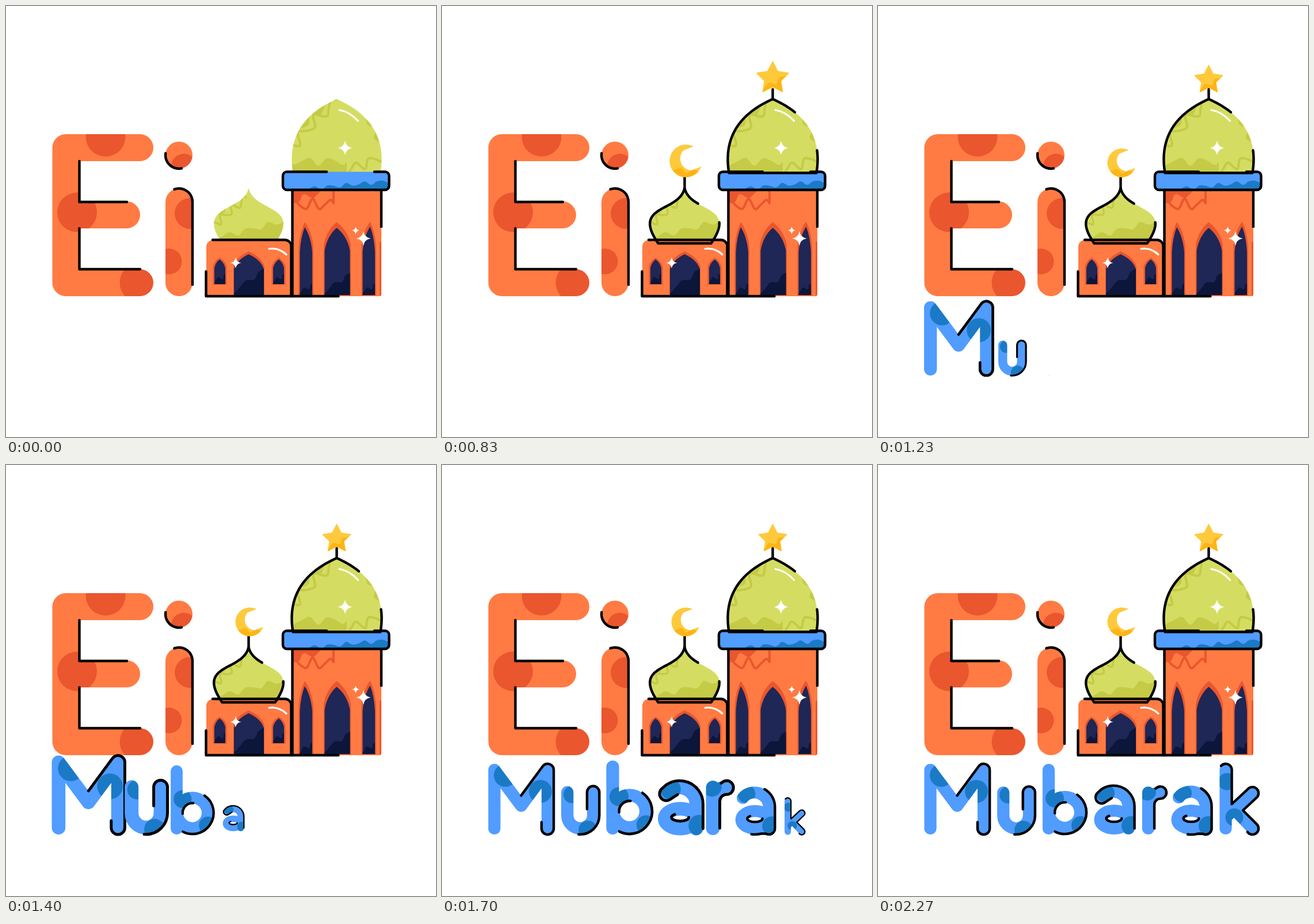
Animation of 747 by 750 pixels, one loop 4.01 s. Source, as an HTML page with a canvas:

```html
<!DOCTYPE html>
<html lang="en">
<head>
<meta charset="utf-8">
<title>Eid Mubarak</title>
<style>
html, body { margin: 0; width: 100%; height: 100%; overflow: hidden; background: #fff; }
canvas { display: block; }
</style>
</head>
<body>
<canvas id="stage" width="747" height="750"></canvas>
<script>
const W = 747, H = 750, LOOP = 4010, { PI } = Math, DEG = PI / 180;
const ORANGE = '#ff7b43', RUST = '#ea562e', BLUE = '#519cff', DEEP = '#1b7ac6';
const LIME = '#d4dd62', OLIVE = '#c5cb46', NAVY = '#1e2756', NIGHT = '#0b163a';
const GOLD = '#ffc93c', AMBER = '#fdb515', INK = '#000', WHITE = '#fff';

const ctx = document.getElementById('stage').getContext('2d');
const layer = document.createElement('canvas');
layer.width = W;
layer.height = H;
const lay = layer.getContext('2d');

// ---- paths ----
const clamp = v => Math.min(1, Math.max(0, v));

function pen(draw) {
  const p = new Path2D();
  draw(p);
  return p;
}

const poly = pts => pen(p => pts.forEach(q => p.lineTo(...q)));
const seg = (x0, y0, x1, y1) => poly([[x0, y0], [x1, y1]]);

function cubic(t, a, b, c, d) {
  const s = 1 - t;
  return s * s * s * a + 3 * s * s * t * b + 3 * s * t * t * c + t * t * t * d;
}

// wavy line between two points
function ripple(x0, y0, x1, y1, n, amp) {
  const dx = x1 - x0, dy = y1 - y0, len = Math.hypot(dx, dy);
  return Array.from({ length: 61 }, (_, i) => {
    const k = i / 60, a = k * n * 2 * PI;
    const off = amp * (Math.sin(a) + 0.3 * Math.sin(1.7 * a + 1)) / len;
    return [x0 + dx * k - dy * off, y0 + dy * k + dx * off];
  });
}

// ---- painting ----
function fill(p, color, c = ctx) {
  c.fillStyle = color;
  c.fill(p);
}

function line(p, color = INK, width = 4.4, c = ctx) {
  c.strokeStyle = color;
  c.lineWidth = width;
  c.lineCap = c.lineJoin = 'round';
  c.stroke(p);
}

function inside(p, draw) {
  ctx.save();
  ctx.clip(p);
  draw();
  ctx.restore();
}

// fills everything to the right of a wavy line, seen along its direction
function shade(color, x0, y0, x1, y1, n, amp) {
  const k = 50 / Math.hypot(x1 - x0, y1 - y0), nx = (y0 - y1) * k, ny = (x1 - x0) * k;
  fill(poly([...ripple(x0, y0, x1, y1, n, amp), [x1 + nx, y1 + ny], [x0 + nx, y0 + ny]]), color);
}

// thick round stroke carrying darker spots
function stroked(body, width, color, spotColor, spots) {
  lay.setTransform(1, 0, 0, 1, 0, 0);
  lay.clearRect(0, 0, W, H);
  lay.setTransform(ctx.getTransform());
  line(body, color, width, lay);
  lay.globalCompositeOperation = 'source-atop';
  for (const [x, y, r] of spots) fill(pen(p => p.arc(x, y, r, 0, 2 * PI)), spotColor, lay);
  lay.globalCompositeOperation = 'source-over';
  ctx.save();
  ctx.resetTransform();
  ctx.drawImage(layer, 0, 0);
  ctx.restore();
}

function trim(pts, part) {
  if (part <= 0) return;
  const steps = pts.slice(1).map((q, i) => Math.hypot(q[0] - pts[i][0], q[1] - pts[i][1]));
  let left = part * steps.reduce((a, b) => a + b);
  const shown = [pts[0]];
  for (let i = 0; i < steps.length && left > 0; i++) {
    const k = steps[i] ? Math.min(1, left / steps[i]) : 1;
    shown.push(pts[i].map((v, j) => v + (pts[i + 1][j] - v) * k));
    left -= steps[i];
  }
  line(poly(shown));
}

function scaled(x, y, s, draw) {
  if (s <= 0) return;
  ctx.save();
  ctx.translate(x, y);
  ctx.scale(s, s);
  ctx.translate(-x, -y);
  draw();
  ctx.restore();
}

function sparkle(x, y, r) {
  fill(pen(p => {
    p.moveTo(x + r, y);
    for (let i = 1; i <= 4; i++) {
      const a = i * PI / 2, m = a - PI / 4;
      p.quadraticCurveTo(x + r * 0.2 * Math.cos(m), y + r * 0.2 * Math.sin(m), x + r * Math.cos(a), y + r * Math.sin(a));
    }
  }), WHITE);
}

const gleam = (x0, y0, cx, cy, x1, y1) =>
  line(pen(p => { p.moveTo(x0, y0); p.quadraticCurveTo(cx, cy, x1, y1); }), WHITE, 3.2);

// ---- big letters ----
function drawEi() {
  const thick = 47, r = thick / 2, [top, mid, low] = [246.5, 363.5, 481.5];
  const E = poly([[232.5, top], [104, top], [104, low], [232.5, low]]);
  E.addPath(seg(104, mid, 209.5, mid));
  stroked(E, thick, ORANGE, RUST, [[173, 227.5, 34.5], [123.5, 359, 34.5], [232, low, 34.5]]);
  line(poly([[127.5, top + r], [127.5, mid - r + 1], [210, mid - r + 1]]));
  line(poly([[127.5, mid + r], [127.5, low - r], [233, low - r]]));

  const x = 300.5;
  stroked(seg(x, 259.5, x, 259.5), thick, ORANGE, RUST, [[309, 279, 22]]);
  line(pen(p => p.arc(x, 259.5, r, 188 * DEG, 79 * DEG, true)));
  stroked(seg(x, 341, x, low), thick, ORANGE, RUST, [[320, 361, 27], [283, 444.5, 22.5]]);
  line(pen(p => { p.arc(x, 341, r, -110 * DEG, 0); p.lineTo(x + r, 485); }));
}

// ---- domes: one half as a cubic, mirrored ----
const bigDome = makeDome(574.5, [0, 45, 88, 76], [162, 182, 218, 290.5], 0.8, 0.3);
const smallDome = makeDome(421.5, [0, 10, 93, 46], [317, 360, 345, 413], 0.76, 0.3);

function makeDome(x, xs, ys, from, to) {
  const side = (sign, a, b) => Array.from({ length: 31 }, (_, i) => {
    const t = a + (b - a) * i / 30;
    return [x + sign * cubic(t, ...xs), cubic(t, ...ys)];
  });
  return {
    shape: poly([...side(-1, 0, 1), ...side(1, 1, 0)]),
    outline: [...side(1, from, 1), ...side(-1, 1, 0), ...side(1, 0, to)]
  };
}

function drawDomes() {
  fill(bigDome.shape, LIME);
  inside(bigDome.shape, () => {
    shade(OLIVE, 494, 270, 592, 270, 2.5, 6);
    shade(OLIVE, 656, 252, 626, 194, 2, 5);
    shade(OLIVE, 566, 166, 500, 224, 2.5, 5);
    line(poly(ripple(574, 164, 496, 243, 3, 8)), OLIVE, 4.2);
    line(poly(ripple(586, 288, 656, 262, 2.5, 7)), OLIVE, 4.2);
  });
  gleam(579, 181, 597, 184, 611.5, 200);
  sparkle(589, 247, 12.5);

  fill(smallDome.shape, LIME);
  inside(smallDome.shape, () => {
    shade(OLIVE, 358, 405, 484, 374, 3.5, 4);
    shade(OLIVE, 412, 330, 360, 370, 2.5, 4);
    line(poly(ripple(418, 334, 364, 378, 3, 6)), OLIVE, 3.6);
  });
}

// ---- buildings ----
function arch(l, r, tip, top, side, base) {
  const y = top + (side - top) * 0.36;
  return pen(p => {
    p.moveTo(l, base);
    p.lineTo(l, side);
    p.quadraticCurveTo(l + (tip - l) * 0.2, y, tip, top);
    p.quadraticCurveTo(r + (tip - r) * 0.2, y, r, side);
    p.lineTo(r, base);
  });
}

function glaze(l, r, tip, top, side, base, frame, rise) {
  fill(arch(l - frame, r + frame, tip, top - rise, side - rise, base + 1), RUST);
  const pane = arch(l, r, tip, top, side, base);
  fill(pane, NAVY);
  inside(pane, () => shade(NIGHT, l - 4, base - 4, r + 4, base - (r - l) * 0.9, 2, 3));
}

function drawHall() {
  fill(pen(p => p.roundRect(348, 407, 148.5, 98, [12, 12, 0, 0])), ORANGE);
  glaze(362, 381, 371, 441, 456, 484, 2.5, 3);
  glaze(396, 448, 421.5, 432, 458, 503, 1, 5);
  glaze(464, 483, 474, 441, 456, 484, 2.5, 3);
  gleam(457, 422.5, 474, 420, 487, 432.5);
  sparkle(399, 447, 9.5);
}

function drawTower() {
  const wall = pen(p => p.roundRect(498, 318, 154, 187, [0, 0, 4, 0]));
  fill(wall, ORANGE);
  inside(wall, () => {
    shade(RUST, 560, 320, 494, 342, 2, 5);
    line(poly([[569, 318], ...ripple(569, 345, 496, 347, 2.5, 8)]), RUST, 4);
    fill(seg(0, 0, 0, 0), RUST);
    line(seg(651, 412, 651, 505), RUST, 4);
    glaze(510.5, 532, 519, 385, 428, 503, 2, 9);
    glaze(553.5, 597.5, 574.5, 386, 426, 503, 1.5, 10);
    glaze(619.5, 641, 632.5, 384, 428, 503, 2, 9);
  });
  sparkle(621, 404.5, 12.5);
  sparkle(607.5, 390.5, 6.5);
}

function drawBand() {
  const l = 481, r = 665.5, t = 288.5, b = 320, c = 7;
  const band = pen(p => p.roundRect(l, t, r - l, b - t, c));
  fill(band, BLUE);
  inside(band, () => shade(DEEP, 512, 319, 672, 304, 5.5, 3));
  line(pen(p => {
    p.moveTo(557, t);
    p.arcTo(l, t, l, b, c);
    p.arcTo(l, b, r, b, c);
    p.arcTo(r, b, r, t, c);
    p.arcTo(r, t, l, t, c);
    p.lineTo(640, t);
  }));
}

function drawMosque() {
  drawDomes();
  drawHall();
  drawTower();
  line(seg(652, 320, 652, 384));
  line(seg(497.5, 320, 497.5, 505));
  line(poly([[347.5, 462], [347.5, 505], [577.5, 505]]));
  line(pen(p => { p.moveTo(359, 407); p.arcTo(495.5, 407, 495.5, 505, 11); p.lineTo(495.5, 505); }));
  drawBand();
}

function drawStar() {
  const star = pen(p => {
    for (let i = 0; i < 10; i++) {
      const r = i % 2 ? 13.2 : 25.8, a = i * PI / 5;
      p.lineTo(574.5 + r * Math.sin(a), 128.8 - r * Math.cos(a));
    }
    p.closePath();
  });
  fill(star, GOLD);
  line(star, GOLD, 1.2);
  inside(star, () => shade(AMBER, 552, 148, 604, 120, 2.5, 3));
}

function drawMoon() {
  const x = 423.5, y = 273, r = 25, q = 18.5, d = 10.5, turn = -21 * DEG;
  const a = Math.acos((d * d + r * r - q * q) / (2 * d * r));
  const b = Math.acos((d * d + q * q - r * r) / (2 * d * q));
  const moon = pen(p => {
    p.arc(x, y, r, turn + a, turn - a);
    p.arc(x + d * Math.cos(turn), y + d * Math.sin(turn), q, turn - b, turn + b, true);
  });
  fill(moon, GOLD);
  inside(moon, () => shade(AMBER, 396, 285, 454, 290, 2.5, 3));
}

// ---- small letters: R is half the stroke, ink runs along its edge ----
const R = 10.6, TOP = 530.5, MID = 570, FOOT = 632.5;

function letter(body, spots, ...ink) {
  stroked(body, 2 * R, BLUE, DEEP, spots);
  ink.forEach(draw => line(pen(draw)));
}

function drawM() {
  const x = 183.5, v = 137.5, dip = 593, lean = Math.atan2(TOP - dip, x - v);
  letter(poly([[91, FOOT], [91, TOP], [v, dip], [x, TOP], [x, FOOT]]), [[110, 540, 20], [171, 568, 20]], p => {
    p.moveTo(v, dip - R / Math.cos(lean));
    p.arc(x, TOP, R, lean - PI / 2, 0);
    p.arc(x, FOOT, R, 0, PI);
    p.lineTo(x - R, 621.5);
  });
}

function drawU() {
  const x = 240, y = 610, bend = 22.3;
  letter(pen(p => {
    p.moveTo(x - bend, MID);
    p.arc(x, y, bend, PI, 0, true);
    p.lineTo(x + bend, MID);
  }), [[226, 574, 15], [253, 635, 16]], p => {
    p.moveTo(x + bend - R, 599);
    p.arc(x + bend, MID, R, PI, 0);
    p.arc(x, y, bend + R, 0, 95 * DEG);
  });
}

function drawB() {
  const x = 324.5, y = 604.5, bowl = 27;
  letter(pen(p => {
    p.moveTo(296.5, TOP);
    p.lineTo(296.5, FOOT);
    p.moveTo(x + bowl, y);
    p.arc(x, y, bowl, 0, 2 * PI);
  }), [[307, 580, 16], [352, 627, 16]],
  p => p.arc(x, y, bowl + R, -55 * DEG, 117 * DEG),
  p => p.arc(x, y, bowl - R + 1, 175 * DEG, 275 * DEG));
}

function drawA(left, open) {
  const x = left + 33, y = 594, rx = 26, ry = 25.5, start = -142 * DEG;
  const bx = x + 1, by = 617, bw = 24, bh = 15.5;
  const tip = [x + rx * Math.cos(start), y + ry * Math.sin(start)];
  letter(pen(p => {
    p.ellipse(x, y, rx, ry, 0, start, 0);
    p.lineTo(x + rx, FOOT);
    p.moveTo(bx + bw, by);
    p.ellipse(bx, by, bw, bh, 0, 0, 2 * PI);
  }), [[left + 19, 571, 16], [left + 64, 628, 17]],
  p => {
    if (!open) {
      p.moveTo(x - 3, 579.5);
      p.arc(...tip, R, 60 * DEG, 230 * DEG);
    }
    p.ellipse(x, y, rx + R, ry + R, 0, open ? -60 * DEG : -125 * DEG, 0);
    p.lineTo(x + rx + R, FOOT);
    if (open) {
      p.arc(x + rx, FOOT, R, 0, 120 * DEG);
      p.ellipse(bx, by, bw + R, bh + R, 0, 70 * DEG, 100 * DEG);
    }
  },
  p => p.ellipse(bx, by - 2, bw - R, bh - R + 1, 0, 0, 230 * DEG));
}

function drawR() {
  const x = 469.5, arm = 21;
  letter(pen(p => {
    p.moveTo(x, MID);
    p.lineTo(x, FOOT);
    p.moveTo(x, MID + arm);
    p.arc(x + arm, MID + arm, arm, PI, -PI / 2);
  }), [[468, 569, 15]], p => {
    p.arc(x + arm, MID, R, -140 * DEG, PI / 2);
    p.arc(x + arm, MID + arm, arm - R, -PI / 2, PI, true);
    p.lineTo(x + R, FOOT);
  });
}

function drawK() {
  const x = 604, tip = 650.5, up = -42 * DEG, down = 45 * DEG;
  letter(pen(p => {
    p.moveTo(x, TOP);
    p.lineTo(x, FOOT);
    p.moveTo(x, 613);
    p.lineTo(tip, 571);
    p.moveTo(620, 600);
    p.lineTo(tip, FOOT);
  }), [[606, 551, 15], [619, 613, 15.5]], p => {
    p.arc(x, TOP, R, -140 * DEG, 0);
    p.lineTo(x + R, 590);
    p.arc(tip, 571, R, up - PI / 2, up + PI / 2);
    p.lineTo(634, 601);
    p.arc(tip, FOOT, R, down - PI / 2, down + 100 * DEG);
  });
}

// each letter grows from its own foot
const WORD = [
  [88, 644, drawM],
  [214, 644, drawU],
  [296, 644, drawB],
  [378, 631, () => drawA(376, false)],
  [461, 637, drawR],
  [521, 634, () => drawA(510, true)],
  [597, 644, drawK]
];

// ---- timeline ----
function ease(x) {
  let a = 0, b = 1;
  for (let i = 0; i < 20; i++) {
    const u = (a + b) / 2;
    if (cubic(u, 0, 0.167, 0.2, 1) < x) a = u; else b = u;
  }
  return cubic(a, 0, 0.167, 1, 1);
}

// grow past full size, then settle
function pop(t, rise, settle) {
  if (t <= 0) return 0;
  if (t < rise) return 1.15 * ease(t / rise);
  return 1 + 0.15 * (1 - clamp((t - rise) / settle)) ** 2;
}

function render(ms) {
  // 30 steps a second, begun on whole hundredths
  const t = Math.floor((Math.floor(ms / 10) + 0.5) * 0.3) * 100 / 3;

  ctx.fillStyle = WHITE;
  ctx.fillRect(0, 0, W, H);
  drawEi();
  drawMosque();

  const drawn = 1 - (1 - clamp(t / 767)) ** 1.5;
  trim(bigDome.outline, drawn);
  trim(smallDome.outline, drawn);

  const stem = clamp((t - 567) / 133);
  trim([[574.5, 162], [574.5, 145]], stem);
  trim([[421.5, 321], [421.5, 298]], stem);

  const top = pop(t - 633, 240, 210);
  scaled(574.5, 151, top, drawStar);
  scaled(422, 298, top, drawMoon);

  WORD.forEach(([x, y, draw], i) => scaled(x, y, pop(t - 1031 - i * 100, 333, 300), draw));
}

const start = performance.now();
function tick() {
  render((performance.now() - start) % LOOP);
  requestAnimationFrame(tick);
}
tick();
</script>
</body>
</html>
```
